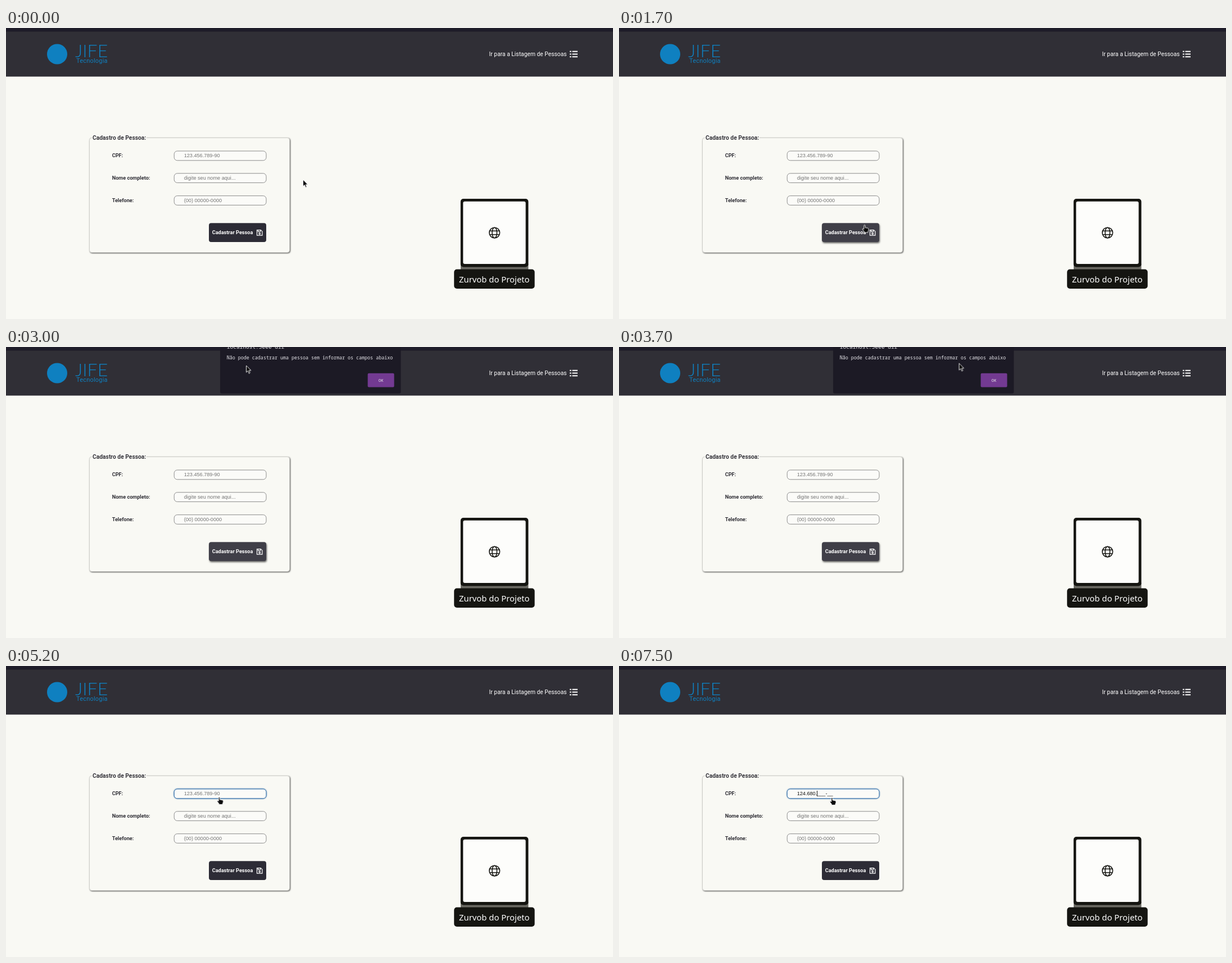
An HTML page for the animation above (8 s loop, 1080 px wide and 518 px high).

```html
<!DOCTYPE html>
<html lang="pt-BR">
<head>
<meta charset="utf-8">
<title>Cadastro de Pessoa</title>
<style>
  html, body { margin: 0; width: 100%; height: 100%; overflow: hidden; background: #f9f9f4; }
  svg { position: absolute; left: 0; top: 0; width: 1080px; height: 518px; }
  text { font-family: Roboto, sans-serif; }
  .label { font-size: 9.13px; font-weight: 700; fill: #2f2e35; }
  .hint { font: 9.13px "Liberation Sans", Arial, sans-serif; fill: #757575; }
  .mono { font-family: "Noto Sans Mono", monospace; fill: #e6e5ea; }
  .field { fill: #fbfbf8; stroke: #8b8b8b; }
  .panel { fill: #f9f9f4; stroke: #cfcfcb; filter: drop-shadow(1px 1px 1.3px #000a); }

  /* One 8 s clock: 1.25% is 100 ms. */
  .save, .focus, .dialog, .ok, .lines, .cursor, .arrow, .hand {
    animation: 8s step-end infinite;
  }
  .save { fill: #2d2c36; animation-name: save; }
  .focus { animation-name: focus; }
  .dialog { opacity: 0; animation-name: dialog; }
  .ok { fill: #733a92; animation-name: ok; }
  .lines { animation-name: typing; }
  .cursor { animation-name: move; }
  .arrow { animation-name: arrow; }
  .hand { animation-name: hand; }

  @keyframes save {
    16.25% { fill: #403f48; filter: drop-shadow(1px 2px 1.5px #0009); }
    60%, 100% { fill: #2d2c36; filter: none; }
  }
  @keyframes focus {
    0% { stroke: #8b8b8b; filter: none; }
    63.75%, 100% { stroke: #2f6ca8; filter: drop-shadow(0 0 .8px #2f6ca8); }
  }
  @keyframes dialog {
    0% { opacity: 0; }
    22.5% { opacity: .6; }
    23.75% { opacity: 1; }
    58.75% { opacity: .5; }
    60%, 100% { opacity: 0; }
  }
  @keyframes ok {
    52.5% { fill: #7b449a; }
    60%, 100% { fill: #733a92; }
  }
  @keyframes arrow {
    0%, 30%, 100% { visibility: visible; }
    16.25%, 63.75% { visibility: hidden; }
    100% { visibility: hidden; }
  }
  @keyframes hand {
    0%, 30% { visibility: hidden; }
    16.25%, 63.75%, 100% { visibility: visible; }
  }
  @keyframes move {
    0% { transform: translate(528px, 269.5px); }
    5% { transform: translate(529px, 269.5px); }
    6.25% { transform: translate(529px, 269.5px); animation-timing-function: steps(4); }
    11.25% { transform: translate(440px, 344px); }
    13.75% { transform: translate(440.5px, 345px); }
    16.25% { transform: translate(387px, 350px); }
    18.75% { transform: translate(438px, 350px); }
    21.25% { transform: translate(437px, 350.5px); }
    27.5% { transform: translate(436px, 350px); }
    28.75% { transform: translate(436px, 350px); animation-timing-function: steps(3); }
    32.5% { transform: translate(564px, 60px); }
    33.75% { transform: translate(470px, 11px); }
    35% { transform: translate(407px, 28px); }
    37.5% { transform: translate(427px, 32.5px); animation-timing-function: steps(8); }
    47.5% { transform: translate(630px, 28px); animation-timing-function: steps(4); }
    52.5% { transform: translate(679px, 58px); animation-timing-function: steps(2); }
    55% { transform: translate(670px, 56px); }
    57.5% { transform: translate(671px, 57px); animation-timing-function: steps(5); }
    63.75% { transform: translate(385px, 232px); }
    65% { transform: translate(379.5px, 233px); }
    72.5%, 100% { transform: translate(379px, 234px); }
  }

  .typed {
    position: absolute; left: 316.7px; top: 220px; width: 140px; height: 14px; overflow: hidden;
    font: 9.13px/14px "Liberation Sans", Arial, sans-serif; color: #111;
  }
  .typed p { margin: 0; height: 14px; white-space: nowrap; }
  .typed p:first-child { color: #757575; }
  .typed i {
    display: inline-block; width: 1px; height: 10px; margin-right: -1px;
    background: #111; vertical-align: -2px;
  }
  @keyframes typing {
    0% { transform: none; }
    68.75% { transform: translateY(-14px); }
    72.5% { transform: translateY(-28px); }
    73.75% { transform: translateY(-14px); }
    77.5% { transform: translateY(-42px); }
    80% { transform: translateY(-56px); }
    85% { transform: translateY(-70px); }
    87.5% { transform: translateY(-84px); }
    93.75%, 100% { transform: translateY(-98px); }
  }
</style>
</head>
<body>
<svg viewBox="0 0 1080 518">
  <!-- header -->
  <rect width="1080" height="86.5" fill="#302f36"/>
  <rect width="1080" height="6.5" fill="#1e1c29"/>
  <g fill="#0f80c0">
    <circle cx="91" cy="46.5" r="18"/>
    <text x="123" y="52" font-size="32" style="font-family:Lato,sans-serif;font-weight:300">JIFE</text>
    <text x="125" y="62" font-size="11" letter-spacing=".2">Tecnologia</text>
  </g>
  <text x="859.5" y="50.3" font-size="10.3" fill="#fff">Ir para a Listagem de Pessoas</text>
  <path d="M1007.5 41.8h9.5m-9.5 4.7h9.5m-9.5 4.7h9.5M1003 41.8h2.8m-2.8 4.7h2.8m-2.8 4.7h2.8"
        stroke="#fff" stroke-width="2"/>

  <!-- form -->
  <rect class="panel" x="148.5" y="195.5" width="356" height="204" rx="4"/>
  <rect x="153" y="190" width="97" height="10" fill="#f9f9f4"/>
  <text x="154" y="198.8" font-size="10.3" font-weight="700" fill="#37363d">Cadastro de Pessoa:</text>
  <text class="label" x="188.7" y="230.3">CPF:</text>
  <text class="label" x="188.7" y="270.2">Nome completo:</text>
  <text class="label" x="188.7" y="310">Telefone:</text>
  <rect class="field focus" x="299.2" y="219" width="163.8" height="16.8" rx="5.5"/>
  <rect class="field" x="299.2" y="258.8" width="163.8" height="16.6" rx="5.5"/>
  <rect class="field" x="299.2" y="298.7" width="163.8" height="16.6" rx="5.5"/>
  <text class="hint" x="316.7" y="270.2">digite seu nome aqui...</text>
  <text class="hint" x="316.7" y="310">(00) 00000-0000</text>
  <rect class="save" x="361" y="347.3" width="102" height="33.7" rx="4"/>
  <text class="label" x="366.7" y="367.4" style="fill:#fff">Cadastrar Pessoa</text>
  <g fill="none" stroke="#fff" stroke-width="1.2">
    <path d="M446.5 359.6h6.8l2.6 2.6v7h-9.4zM448.5 359.6v3h4v-3"/>
    <circle cx="451.2" cy="366" r="1.3"/>
  </g>

  <!-- project card -->
  <rect x="809" y="420" width="120.4" height="14" fill="#6a6963"/>
  <rect x="808.8" y="304" width="120.6" height="121.5" rx="5" fill="#151511"/>
  <rect x="813.3" y="308.7" width="111.3" height="111.3" rx="3" fill="#fdfdfb"/>
  <g fill="none" stroke="#151511" stroke-width="1.6">
    <circle cx="869.2" cy="364.5" r="9.3"/>
    <ellipse cx="869.2" cy="364.5" rx="4.3" ry="9.3"/>
    <path d="M860.5 361.3h17.4m-17.4 6.4h17.4"/>
  </g>
  <rect x="797.2" y="429.6" width="143.4" height="34.4" rx="5" fill="#151511"/>
  <text x="868.8" y="452.6" font-size="14.85" fill="#fff" text-anchor="middle"
        style="font-family:'Noto Sans',sans-serif">Zurvob do Projeto</text>

  <!-- alert -->
  <g class="dialog">
    <rect x="381" y="-20" width="321.5" height="102.8" rx="3" fill="#1c1a25"/>
    <text class="mono" x="392.8" y="3" font-size="9.5">localhost:3000 diz</text>
    <text class="mono" x="392.8" y="21.5" font-size="8.35">Não pode cadastrar uma pessoa sem informar os campos abaixo</text>
    <rect class="ok" x="643.6" y="46.8" width="47" height="24.8" rx="2"/>
    <text class="mono" x="667.2" y="62" font-size="7.4" text-anchor="middle">OK</text>
  </g>
</svg>

<div class="typed"><div class="lines">
  <p>123.456.789-90</p>
  <p><i></i>___.___.___-__</p>
  <p>___.___.___-__</p>
  <p>1<i></i>__.___.___-__</p>
  <p>124.<i></i>___.___-__</p>
  <p>124.6<i></i>__.___-__</p>
  <p>124.68<i></i>_.___-__</p>
  <p>124.680.<i></i>___-__</p>
</div></div>

<svg viewBox="0 0 1080 518">
  <g class="cursor" fill="#0b0b0b" stroke="#fff" stroke-width=".9" stroke-linejoin="round">
    <path class="arrow" d="M.5.5V12.5L3.3 9.9 5.2 14.3 7.2 13.4 5.3 9.2H9z"/>
    <path class="hand" d="M-1.2 1.2Q-1.2.2-.1.2T1 1.2V4.8L5.6 5.7Q7 6 7 7.5V9.4L6 11.8V13.4H-.8V11.8L-3.8 8Q-4 6.4-2.5 6.7L-1.2 7.6z"/>
  </g>
</svg>
</body>
</html>
```
